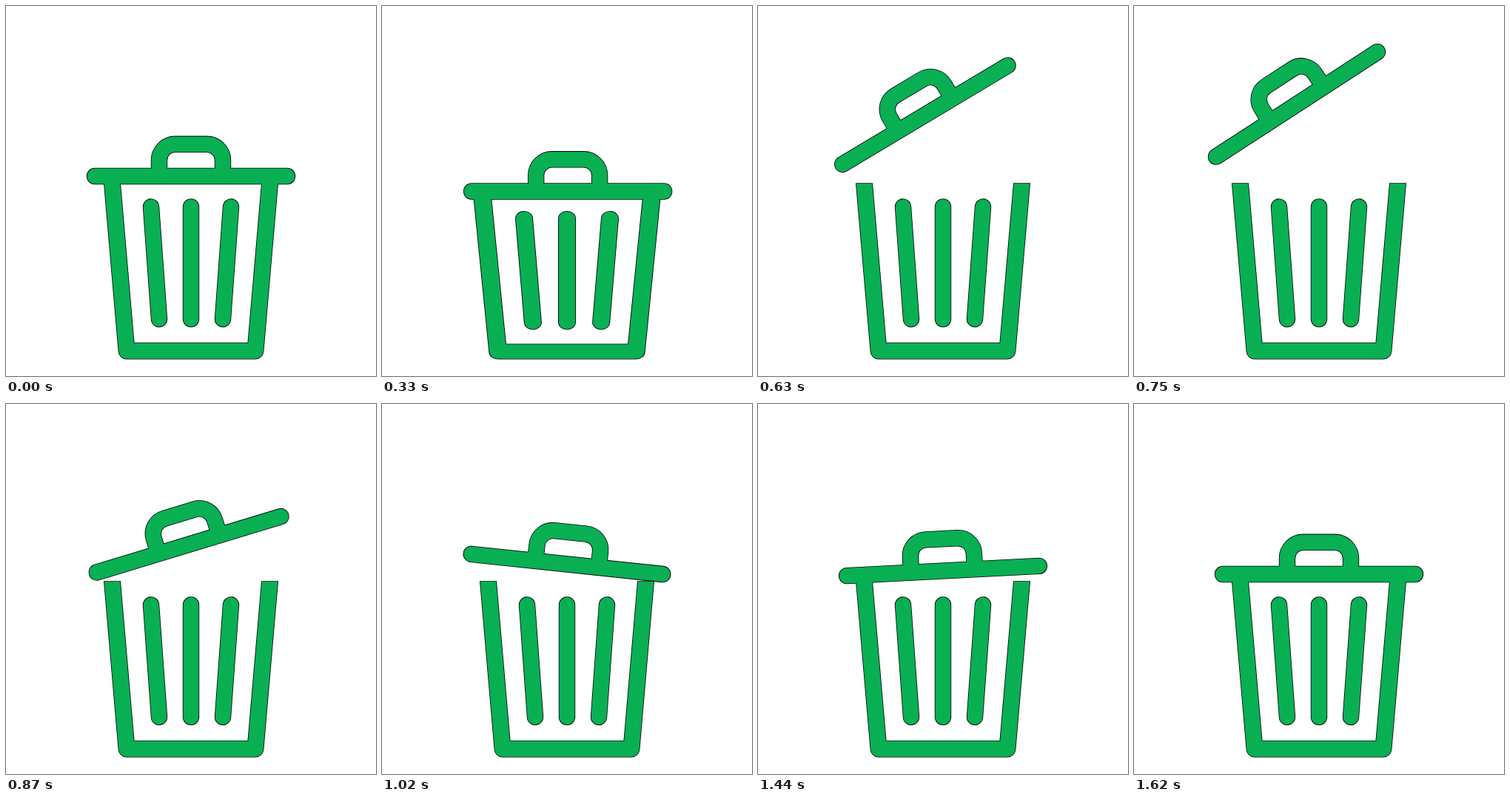
An HTML page with a canvas that plays this animation: 500 px wide and 500 px high, repeating every 1800 ms.

```html
<!DOCTYPE html>
<html lang="en">
<head>
<meta charset="utf-8">
<title>Trash bin</title>
<style>
  html, body { margin: 0; width: 100%; height: 100%; overflow: hidden; background: #fff; }
  canvas { display: block; width: 100vmin; height: 100vmin; }
</style>
</head>
<body>
<canvas id="stage" width="500" height="500"></canvas>
<script>
const ctx = document.getElementById('stage').getContext('2d');
const LOOP = 1800, STEP = 30;
const GREEN = '#08b053', EDGE = '#000';
const CENTER = 250, FLOOR = 477.5, RIM = 239.2, LID_Y = 230;
const HALF_LID = 130, LINE = 22.4;

// Smooth progress from 0 to 1 between two times; a bias below 1 starts faster.
function progress(t, from, to, bias = 1) {
  const u = Math.min(1, Math.max(0, (t - from) / (to - from)));
  return (1 - Math.cos(Math.PI * u ** bias)) / 2;
}

const pulse = (t, from, peak, to) => progress(t, from, peak) - progress(t, peak, to);

function pose(t) {
  const crouch = progress(t, 225, 390);
  const launch = progress(t, 390, 750, 0.82);
  const fall = progress(t, 750, 900);
  const slap = pulse(t, 890, 945, 1010);
  const settle = pulse(t, 1400, 1500, 1620);

  const degrees = -33 * progress(t, 390, 700, 0.7) + 42 * progress(t, 750, 1090, 0.82)
    - 18 * progress(t, 1090, 1360) + 9 * progress(t, 1360, 1490);
  const angle = degrees * Math.PI / 180;
  // The lower end of the tilted lid rests on the rim.
  const tilt = HALF_LID * Math.abs(Math.sin(angle));

  return {
    angle,
    x: CENTER + 1.6 * crouch - 31.6 * launch + 30 * fall,
    y: LID_Y - tilt + 29 * crouch - 55.4 * launch + 26.4 * fall + 5 * slap + 6 * settle,
    squash: crouch - progress(t, 390, 600) + 0.2 * slap
  };
}

function line(x1, y1, x2, y2) {
  ctx.beginPath();
  ctx.moveTo(x1, y1);
  ctx.lineTo(x2, y2);
  ctx.stroke();
}

// Body coordinates start at the middle of the floor.
function drawBody(squash, inset) {
  ctx.save();
  ctx.translate(CENTER, FLOOR);
  ctx.scale(1 + 0.104 * squash, 1 - 0.108 * squash);
  for (const side of [-1, 0, 1]) line(54 * side, -206, 43 * side, -54.5);

  ctx.beginPath();
  ctx.rect(-CENTER, RIM - FLOOR + inset, 2 * CENTER, FLOOR);
  ctx.clip();
  ctx.lineWidth += 0.5;
  ctx.beginPath();
  ctx.moveTo(-108.2, -257.5);
  ctx.lineTo(-87, -11.4);
  ctx.lineTo(87, -11.4);
  ctx.lineTo(108.2, -257.5);
  ctx.stroke();
  ctx.restore();
}

// Lid coordinates start at its own middle.
function drawLid({ x, y, angle }) {
  ctx.save();
  ctx.translate(x, y);
  ctx.rotate(angle);
  line(-HALF_LID, 0, HALF_LID, 0);
  ctx.beginPath();
  ctx.moveTo(-43, -2);
  ctx.arcTo(-43, -43.2, 0, -43.2, 21.5);
  ctx.arcTo(43, -43.2, 43, -2, 21.5);
  ctx.lineTo(43, -2);
  ctx.stroke();
  ctx.restore();
}

function draw(t) {
  const now = pose(t);
  ctx.fillStyle = '#fff';
  ctx.fillRect(0, 0, 500, 500);
  ctx.lineCap = ctx.lineJoin = 'round';
  // The dark pass leaves a thin outline around the joined green shapes.
  for (const [color, inset] of [[EDGE, 0], [GREEN, 0.8]]) {
    ctx.strokeStyle = color;
    ctx.lineWidth = LINE - 2 * inset;
    drawBody(now.squash, inset);
    drawLid(now);
  }
}

const start = performance.now();
function frame() {
  const t = (performance.now() - start) % LOOP;
  draw(Math.floor(t / STEP) * STEP);
  requestAnimationFrame(frame);
}
frame();
</script>
</body>
</html>
```
